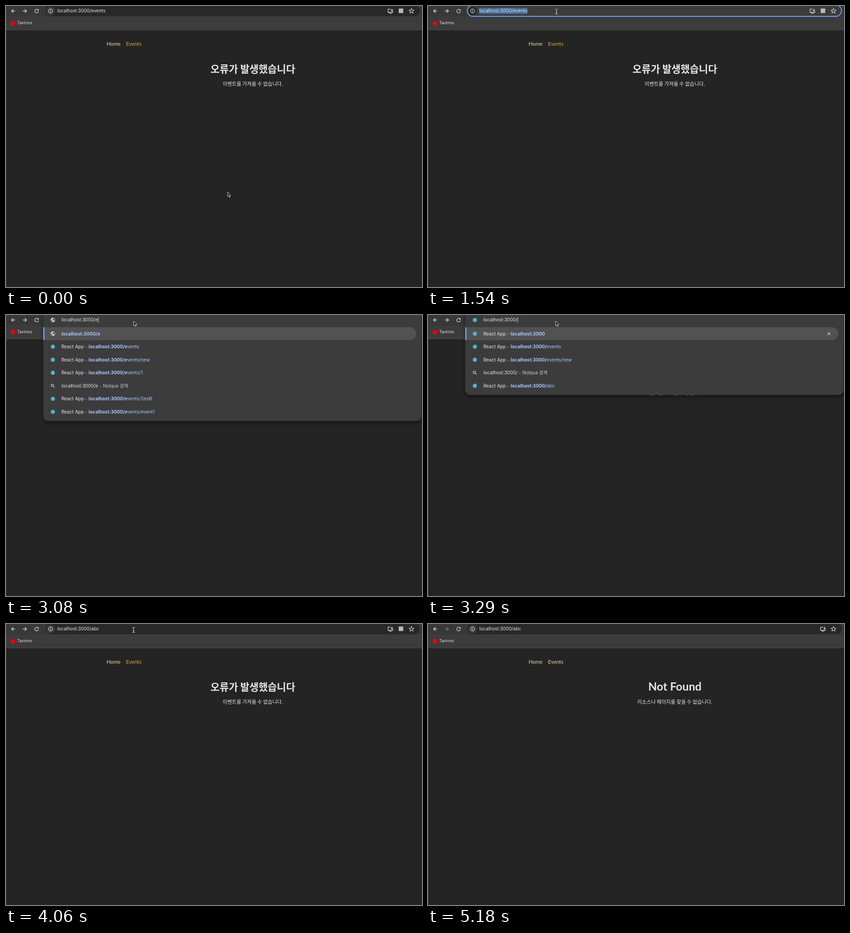
These frames come from a looping animation (910x616 px, 6020 ms). An HTML page with a canvas:

```html
<!DOCTYPE html>
<html lang="ko">
<head>
<meta charset="utf-8">
<title>Not Found</title>
<style>
html, body { margin: 0; width: 100%; height: 100%; overflow: hidden; background: #242424; }
canvas { display: block; width: 910px; height: 616px; }
</style>
</head>
<body>
<canvas id="stage"></canvas>
<script>
const W = 910, H = 616, LOOP = 6020;
const canvas = document.getElementById('stage');
const ctx = canvas.getContext('2d');
const dpr = window.devicePixelRatio || 1;
canvas.width = W * dpr;
canvas.height = H * dpr;

const UI = 'Inter, "Noto Sans CJK KR", "Noto Sans CJK JP", sans-serif';
const KO = '"Noto Sans CJK KR", "Noto Sans CJK JP", "Noto Sans CJK", sans-serif';
const LATIN = 'Lato, sans-serif';
const BAR = '#3c3c3c', TOP = '#383838', PAGE = '#242424', FIELD = '#282828';
const WHITE = '#e6e6e6', ICON = '#d6d6d6', LINK = '#a8c7fa', SELECT = '#456b9c';
const HOST = 'localhost:3000/';
const ROW = 28.55, FIRST = 41;

// time, x, y, shape: a = arrow, i = text beam, empty = hidden
const pointer = [
  [0, 484.5, 407.5, 'a'], [140, 456, 300, 'a'], [210, 372, 44.5, 'a'], [280, 0, 0, ''],
  [490, 352, 19, 'i'], [560, 328, 17, 'i'], [630, 308, 15, 'i'], [700, 294, 13, 'i'],
  [770, 288, 13, 'i'], [1540, 281, 12.5, 'i'], [1610, 281, 17, 'i'], [1680, 280, 19, 'i'],
  [1750, 279, 16, 'i'], [1820, 279, 13, 'i'], [2310, 279, 13.2, 'a'], [4060, 279, 13, 'i'],
  [4480, 300, 70, 'a'], [4550, 370, 270, 'a'], [4620, 402, 367.5, 'a'],
  [5110, 402, 388, 'a'], [5180, 0, 0, '']
];

// time, typed path, completed tail, suggestion list
const typing = [
  [2310, 'event', '', 'long'], [2520, 'even', '', 'long'], [2730, 'eve', '', 'long'],
  [2870, 'ev', '', 'long'], [3080, 'e', '', 'long'], [3290, '', '', 'root'],
  [3360, 'a', 'bc', 'root'], [3430, 'a', 'bc', 'short'], [3570, 'ab', 'c', 'short'],
  [3780, 'abc', '', 'short']
];

const at = (keys, t) => keys.filter(k => k[0] <= t).pop();

function text(s, x, y, color, size, family = UI, weight = 400, align = 'left') {
  ctx.font = `${weight} ${size}px ${family}`;
  ctx.textAlign = align;
  ctx.fillStyle = color;
  ctx.fillText(s, x, y);
  return ctx.measureText(s).width;
}

function disc(x, y, r, color) {
  ctx.fillStyle = color;
  ctx.beginPath();
  ctx.arc(x, y, r, 0, Math.PI * 2);
  ctx.fill();
}

function box(x, y, w, h, r, color) {
  ctx.fillStyle = color;
  ctx.beginPath();
  ctx.roundRect(x, y, w, h, r);
  ctx.fill();
}

function line(path, color, width = 1.3) {
  ctx.strokeStyle = color;
  ctx.lineWidth = width;
  ctx.stroke(new Path2D(path));
}

function place(x, y, draw) {
  ctx.save();
  ctx.translate(x, y);
  draw();
  ctx.restore();
}

const icons = {
  back: c => line('M4 0H-4M0 -4L-4 0L0 4', c),
  forward: c => line('M-4 0H4M0 -4L4 0L0 4', c),
  reload(c) {
    line('M3.2 -2.2A4 4 0 1 0 3.9 1', c);
    ctx.fillStyle = c;
    ctx.fill(new Path2D('M4.4 -4.6V-0.8H0.6Z'));
  },
  info(c) {
    line('M4.3 0A4.3 4.3 0 1 1 -4.3 0A4.3 4.3 0 1 1 4.3 0M0 -0.6V2.4M0 -2.4V-1.3', c, 1.2);
  },
  install(c) {
    line('M0.5 -4.2H-5.2V3H5.2V1M-2.5 4.8H2.5M3.4 -5V0M1.2 -2L3.4 0.3L5.6 -2', c);
  },
  star(c) {
    let d = '';
    for (let i = 0; i < 10; i++) {
      const r = i % 2 ? 2.4 : 5.6, a = i * Math.PI / 5 - Math.PI / 2;
      d += (i ? 'L' : 'M') + r * Math.cos(a) + ' ' + r * Math.sin(a);
    }
    line(d + 'Z', c, 1.1);
  },
  globe(c) {
    disc(0, 0, 5, c);
    ctx.fillStyle = BAR;
    ctx.fill(new Path2D('M-4 -0.8L-1 2V4C-3 3.4 -4.2 1.6 -4 -0.8ZM1 -4L3.2 -2.8C4.4 -1 4.2 1.2 3.2 2.6L2 1V-0.6H-1.2V-1.8L1 -2.6Z'));
  },
  search: c => line('M1.6 -1A2.6 2.6 0 1 1 -3.6 -1A2.6 2.6 0 1 1 1.6 -1M1 1L4 4', c, 1.2),
  close: c => line('M-3.2 -3.2L3.2 3.2M3.2 -3.2L-3.2 3.2', c, 1.2),
  app: () => disc(0, 0, 4.6, '#4fb3cf')
};

const icon = (name, x, y, color = ICON) => place(x, y, () => icons[name](color));

function drawPage(lost) {
  ctx.fillStyle = PAGE;
  ctx.fillRect(0, 0, W, H);
  text('Home', 220, 87.3, '#f0d7a4', 11.5, LATIN);
  text('Events', 262.5, 87.3, lost ? '#f0d7a4' : '#dfa94a', 11.5, LATIN);
  if (lost) {
    text('Not Found', 540, 146.3, WHITE, 24.7, LATIN, 700, 'center');
    text('리소스나 페이지를 찾을 수 없습니다.', 540, 175, WHITE, 11, KO, 400, 'center');
  } else {
    text('오류가 발생했습니다', 540, 146.3, WHITE, 21.8, KO, 700, 'center');
    text('이벤트를 가져올 수 없습니다.', 540, 175, WHITE, 11, KO, 400, 'center');
  }
}

function drawToolbar(lost) {
  ctx.fillStyle = BAR;
  ctx.fillRect(0, 0, W, 52);
  ctx.fillStyle = TOP;
  ctx.fillRect(0, 0, W, 23);
  ctx.fillStyle = '#4a4a4a';
  ctx.fillRect(0, 52, W, 1);
  ctx.fillRect(0, 0, 0.8, H);
  icon('back', 16, 11);
  icon('forward', 41, 11, lost ? '#7c7c7c' : ICON);
  icon('reload', 67, 11);
  disc(15, 38, 5, '#f00000');
  text('Tavirmo', 24.5, 40.2, WHITE, 8.6);
}

function drawField(t, path, lost) {
  const focus = t >= 840 && t < 2310;
  box(86, -2, 819, 24.5, 12.2, focus ? BAR : FIELD);
  if (focus) {
    ctx.strokeStyle = '#6fa2f0';
    ctx.lineWidth = 1.9;
    ctx.beginPath();
    ctx.roundRect(86, -2, 818.5, 24.7, 12.3);
    ctx.stroke();
  }
  disc(97.5, 11, 9.4, focus ? FIELD : BAR);
  icon('info', 97.5, 11);
  const url = HOST + path;
  ctx.font = `400 10px ${UI}`;
  const end = 112 + ctx.measureText(url).width;
  if (t >= 910 && t < 1680) box(112, 4, end - 112, 13.5, 0, SELECT);
  text(url, 112, 14.2, WHITE, 10);
  if (focus && t >= 1680) box(end + 0.3, 4.5, 0.8, 12.5, 0, WHITE);
  if (lost) {
    icon('install', 864, 11);
  } else {
    icon('install', 841, 11);
    box(859, 5.5, 10, 10, 1, '#b8b8b8');
  }
  icon('star', 887, 11);
}

const page = rest => ({ kind: 'app', rest });

function suggestions(list) {
  const search = { kind: 'search' };
  if (list === 'long') return [
    { kind: 'globe' }, page('events'), page('events/new'), page('events/1'),
    search, page('events/1/edit'), page('events/event1')
  ];
  if (list === 'root') return [page(null), page('events'), page('events/new'), search, page('abc')];
  return [page('abc'), search];
}

function drawRow(row, y, typed) {
  const base = y + 3.6, url = HOST + typed;
  let x = 121.3;
  const dash = () => {
    text('–', x + 3, base, '#c4c4c4', 8);
    x += 10.8;
  };
  icon(row.kind, 102.5, y);
  if (row.kind === 'globe') {
    text(url, x, base, LINK, 10, UI, 700);
  } else if (row.kind === 'search') {
    x += text(url, x, base, WHITE, 10);
    dash();
    text('Nolqua 검색', x, base, '#c9c9c9', 10);
  } else {
    x += text('React ', x, base, WHITE, 10);
    x += text('A', x, base, WHITE, 10, UI, typed === 'a' ? 700 : 400);
    x += text('pp', x, base, WHITE, 10);
    dash();
    const bold = row.rest === null ? HOST.slice(0, -1) : url;
    x += text(bold, x, base, LINK, 10, UI, 700);
    if (row.rest) text(row.rest.slice(typed.length), x, base, LINK, 10);
  }
}

function drawDropdown([, typed, tail, list]) {
  const key = list === 'root' ? '' : typed;
  const rows = suggestions(list);
  const bottom = FIRST + ROW * (rows.length - 1) + 20;
  ctx.save();
  ctx.shadowColor = 'rgba(0,0,0,0.45)';
  ctx.shadowBlur = 8 * dpr;
  ctx.shadowOffsetY = 4 * dpr;
  box(81.3, -20, 827.4, bottom + 20, 11, BAR);
  ctx.restore();

  box(81.3, 26.7, 816, 28.3, [0, 14, 14, 0], '#525252');
  box(81.5, 26.7, 2.7, 28.3, [0, 2, 2, 0], '#6a9ff0');
  rows.forEach((row, i) => drawRow(row, FIRST + ROW * i, key));
  if (list !== 'long') icon('close', 877, FIRST);

  icon(list === 'long' ? 'globe' : 'app', 102.5, 11);
  const x = 121.3;
  const end = x + text(HOST + typed, x, 14.2, WHITE, 10);
  if (tail) {
    ctx.font = `400 10px ${UI}`;
    box(end, 4, ctx.measureText(tail).width, 13.5, 0, SELECT);
    text(tail, end, 14.2, WHITE, 10);
  } else {
    box(end + 0.3, 4.5, 0.8, 12.5, 0, WHITE);
  }
}

function drawPointer([, x, y, shape]) {
  if (!shape) return;
  place(x, y, () => {
    ctx.lineJoin = 'round';
    if (shape === 'a') {
      const arrow = new Path2D('M0.4 0.4V10.2L2.6 8.2L4.1 11.8L5.8 11.1L4.3 7.6H7.3Z');
      ctx.fillStyle = '#0c0c0c';
      ctx.fill(arrow);
      ctx.strokeStyle = '#f2f2f2';
      ctx.lineWidth = 0.9;
      ctx.stroke(arrow);
    } else {
      const beam = 'M-3 -5.8Q0 -5.8 0 -3.6Q0 -5.8 3 -5.8M0 -3.6V3.6M-3 5.8Q0 5.8 0 3.6Q0 5.8 3 5.8M-1.5 1.8H1.5';
      line(beam, '#101010', 2.4);
      line(beam, '#ececec', 1.1);
    }
  });
}

function draw(t) {
  const lost = t >= 4130;
  ctx.setTransform(dpr, 0, 0, dpr, 0, 0);
  drawPage(lost);
  drawToolbar(lost);
  if (t >= 2310 && t < 4060) drawDropdown(at(typing, t));
  else drawField(t, t < 2310 ? 'events' : 'abc', lost);
  drawPointer(at(pointer, t));
}

const start = performance.now();
function tick() {
  draw((performance.now() - start) % LOOP);
  requestAnimationFrame(tick);
}
tick();
</script>
</body>
</html>
```
